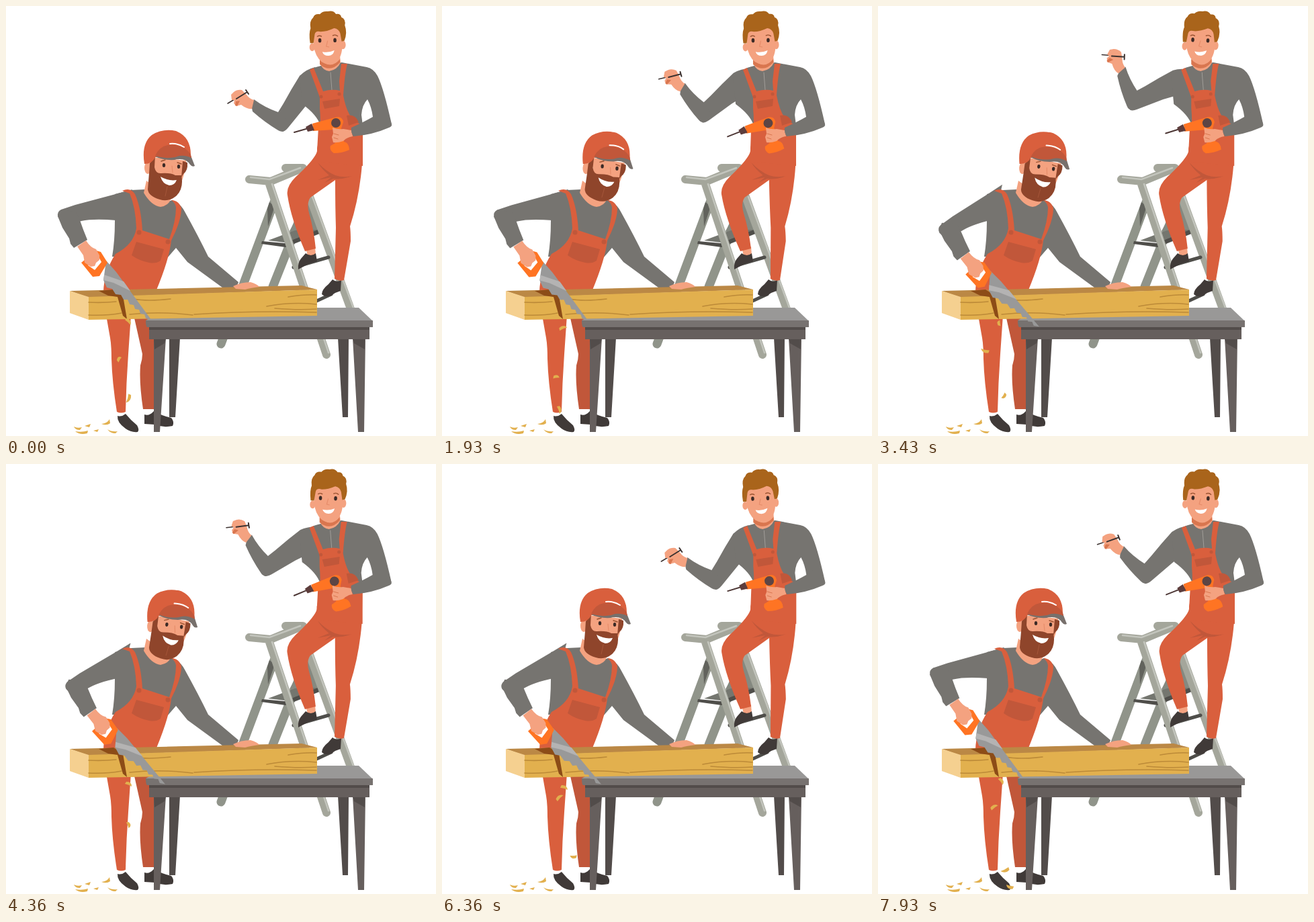
Recreate the animation shown at these times as an HTML page. Size 640 px wide and 640 px high, loop 8000 ms.

```html
<!DOCTYPE html>
<html lang="en">
<head>
<meta charset="utf-8">
<title>Carpenters at work</title>
<style>
html, body { margin: 0; width: 100%; height: 100%; overflow: hidden; background: #fff; }
svg { display: block; width: 100vw; height: 100vh; }
.red { fill: #d95f3d; } .rust { fill: #c1573a; } .shirt { fill: #767470; }
.skin { fill: #f4a280; } .blush { fill: #d9764f; } .hair { fill: #a9641b; } .beard { fill: #8f452b; }
.shoe { fill: #403a38; } .tool { fill: #ff7423; } .dark { fill: #524c4a; } .table { fill: #665f5d; }
.wood { fill: #e2b04e; } .white { fill: #fff; } .eye { fill: #3b2a26; }
.line { fill: none; stroke-linecap: round; stroke-linejoin: round; }
.rail { stroke: #a4a69b; stroke-width: 12; } .back { stroke: #90948a; stroke-width: 13; }
.shine { stroke: #c3c5bd; stroke-width: 2.5; } .step { stroke: #4f4e4a; stroke-width: 5; }
.grain { stroke: #bc8a38; stroke-width: 1.6; } .brow { stroke: #9a5230; stroke-width: 1.4; }
</style>
</head>
<body>
<svg viewBox="0 0 640 640">
  <g id="ladder">
    <path class="line back" d="M399 292L320 503M444 300L397 418"/>
    <path fill="#62635d" d="M392 292L400 298 390 328 389 302Z"/>
    <path fill="#858980" d="M422 335L448 286 456 290 466 334 430 347Z"/>
    <path fill="#74766f" d="M390 349L430 334 467 333 415 352Z"/>
    <path fill="#4f4e4a" d="M381 350L414 353 467 332 469 338 416 359 380 354Z"/>
    <path class="line rail" d="M452 284L520 470"/>
    <path class="line shine" d="M456 284L518 452"/>
    <path class="line step" d="M428 389L480 374M458 441L484 429"/>
    <path class="line rail" d="M416 241L442 241 394 261 362 258M391 262L477 519"/>
    <path class="line shine" d="M364 255L392 258 438 241M396 265L480 516"/>
  </g>

  <path class="skin" d="M446 359L460 358 461 371 449 372Z"/>
  <path class="shoe" d="M435 392Q434 382 439 376L446 368Q454 374 461 368L463 380 450 384Z"/>
  <path class="shoe" d="M470 429Q470 422 480 414L486 407Q492 412 499 408L498 424 490 427 484 431Q475 434 470 429Z"/>
  <g id="legs">
    <path class="red" d="M463 216Q461 226 436 250Q416 267 419 282Q424 316 445 365L461 361Q458 332 451 308Q447 294 453 285L490 259Q490 300 491 330L489 406Q496 410 503 408L513 350Q513 335 512 328Q526 285 530 235L531 180 465 180Z"/>
    <path class="rust" d="M464 233Q476 246 490 252Q502 256 515 253Q500 259 487 257L474 263 484 255 464 259 481 252Q470 243 464 233Z"/>
  </g>

  <g id="painter">
    <g id="upperArm">
      <path class="shirt" d="M460 91Q447 94 437 104Q425 123 413 145L405 158 397 166 396 176 411 187Q415 187 420 181L446 149 464 130Z"/>
      <g id="foreArm">
        <path class="shirt" d="M405 158Q385 151 369 139Q364 147 367 157Q385 173 405 185Q411 189 416 184L422 172Z"/>
        <path class="line" stroke="#3c3230" stroke-width="1.5" d="M330 145L345 136"/>
        <path class="skin" d="M369 140Q362 138 358 132L351 125Q344 124 339 128L335 132 336 140 340 140 339 145 343 149 350 147Q359 154 366 153Z"/>
        <path class="blush" d="M342 142L348 141 344 149 341 148Z"/>
        <path class="line" stroke="#3c3230" stroke-width="2" d="M343 138L359 128M357 125L361 131"/>
      </g>
    </g>
    <path class="shirt" d="M456 93Q470 87 500 84L537 91Q547 93 553 104Q562 122 574 176L546 165Q544 150 538 139Q530 147 529 162L531 178 468 178Q463 162 441 146L437 104Z"/>
    <path class="line" stroke="#a19e99" stroke-width="1" d="M483 99L485 125"/>
    <path class="red" d="M452 95L458 92 472 127Q485 123 497 126L496 112 499 86 508 86Q504 102 502 133Q506 155 514 166Q521 174 531 177L531 238 463 232 463 212Q470 185 467 152L467 136Z"/>
    <path class="rust" d="M471 142L497 138 496 149 474 153ZM507 163Q520 160 525 173L510 178Z"/>
    <circle class="rust" cx="469" cy="135" r="2.5"/><circle class="rust" cx="496" cy="131" r="2.5"/>
    <path class="skin" d="M467 76L497 74 498 84Q493 95 481 97Q472 96 468 87Z"/>
    <path class="blush" d="M467 79Q483 96 497 79L497 84Q483 100 467 87Z"/>
    <g id="painterHead">
      <ellipse class="skin" cx="456" cy="61" rx="4" ry="6"/><ellipse class="skin" cx="502" cy="58" rx="4" ry="6.5"/>
      <path class="skin" d="M458 32L500 30 501 56Q501 76 491 84Q481 90 470 83Q460 75 458 57Z"/>
      <path class="hair" d="M453 55Q451 40 454 33Q452 22 458 17Q460 11 468 12Q472 7 480 8Q488 6 492 12Q499 11 500 17Q507 20 505 29Q509 40 504 52L500 53 498 41Q496 34 489 33Q478 38 469 38Q461 36 460 42L458 55Z"/>
      <ellipse class="eye" cx="467.500" cy="51" rx="2.300" ry="3.200"/><ellipse class="eye" cx="490" cy="51" rx="2.300" ry="3.200"/>
      <path class="line brow" d="M464 45Q467 43 470 45M487 44Q491 42 494 45"/>
      <path class="line" stroke="#e68d6a" stroke-width="1.2" d="M479 52L477 60 481 61"/>
      <path class="white" d="M471 68Q480 70 489 66Q487 74 480 74Q473 74 471 68Z"/>
    </g>
    <g id="drill">
      <path class="line" stroke="#4d3735" stroke-width="2" d="M429 188L450 182"/>
      <path class="tool" d="M456 175L493 165Q501 165 502 173L499 182 503 202Q510 203 511 214Q500 219 488 219Q481 215 483 208L490 204 487 184 457 186Z"/>
      <path fill="#5d3d3c" d="M446 180L455 175 459 185 449 187Z"/>
      <circle fill="#5d4544" cx="491" cy="174" r="7"/>
    </g>
    <path class="skin" d="M486 181Q493 184 502 183L514 185 516 194Q508 195 502 201Q493 204 487 203L485 195 487 190Z"/>
    <path class="line" stroke="#d9764f" stroke-width="1" d="M488 190L495 192M488 196L494 198"/>
    <path class="shirt" d="M546 165Q532 173 514 181Q513 188 517 194Q545 192 570 181Q575 179 574 176L565 150Z"/>
  </g>

  <path class="white" d="M164 600L178 600 179 609 167 611ZM206 597L220 597 219 608 208 609Z"/>
  <path class="rust" d="M190 460L222 460 220 600 204 600Q198 560 200 535Q203 526 203 518Z"/>
  <path class="red" d="M149 460L186 460 182 518Q179 560 178 604Q171 607 165 604Q158 560 157 525Q157 505 155 494Z"/>
  <path class="shoe" d="M166 610Q172 612 178 607Q186 617 195 624Q199 631 196 634Q186 635 178 629Q165 620 166 610ZM206 608Q213 611 220 603Q232 610 246 613Q251 619 248 625Q234 628 222 623L206 622Z"/>

  <path id="sawUpper" class="shirt" d="M188 273L163 280 103 296 82 303Q76 306 77 313L84 326 112 320Q130 316 164 319L172 300Z"/>
  <path class="shirt" d="M162 280L186 274 207 273Q224 300 247 289Q259 293 266 306Q287 344 301 373L346 411 343 419 322 419 270 381 253 360 240 375 158 373Q162 350 162 320Z"/>
  <path class="skin" d="M209 260L205 278Q216 297 230 299Q242 297 245 288L236 280Z"/>
  <path class="red" d="M173 275Q185 269 192 280Q201 300 203 334L243 347Q253 320 253 300Q252 293 246 289Q257 289 261 301Q261 320 246 349Q243 377 223 425L145 425Q146 395 163 369Q190 355 194 331Q193 300 184 279Z"/>
  <path class="rust" d="M194 351L235 362 230 379Q223 384 213 382Q198 379 187 371Z"/>
  <circle class="rust" cx="198" cy="337" r="3.500"/><circle class="rust" cx="241" cy="351" r="3.500"/>

  <g id="sawyerHead">
    <ellipse class="skin" cx="211" cy="241" rx="5" ry="9"/>
    <path class="skin" d="M218 225L268 230Q267 248 261 262L225 262Z"/>
    <path class="beard" d="M263 231L270 233Q271 245 264 250L261 255Z"/>
    <path class="beard" d="M214 234L222 222 221 240Q223 250 231 249Q245 248 252 252L261 252Q265 272 253 283Q242 292 229 288Q212 283 211 273L213 249Z"/>
    <path class="white" d="M230 254Q242 261 254 259Q251 267 243 267Q233 265 230 254Z"/>
    <path class="line" stroke="#a5563a" stroke-width="1" d="M240 269L237 283"/>
    <ellipse class="eye" cx="235" cy="237" rx="2.200" ry="3"/><ellipse class="eye" cx="257" cy="239" rx="2.200" ry="3"/>
    <path class="line brow" d="M231 231L237 229M255 233L261 235"/>
    <path class="line" stroke="#e68d6a" stroke-width="1.2" d="M247 238L248 248"/>
    <path class="red" d="M206 235Q201 205 217 192Q233 182 253 186Q276 195 275 224L222 225Q218 235 206 235Z"/>
    <path fill="#77706c" d="M222 224Q248 216 274 220L281 238Q277 240 274 236Q267 225 251 229Q234 230 222 224Z"/>
    <path class="rust" d="M222 223Q228 209 241 207Q265 205 275 221L276 226Q262 220 252 225Q236 228 222 223Z"/>
    <path class="line" stroke="#fff" stroke-width="2" d="M244 205Q256 204 265 210"/>
  </g>

  <path class="dark" d="M243 494L259 494 252 612 243 612ZM494 494L510 494 509 612 501 612Z"/>
  <path class="table" d="M220 494L238 494 229 634 220 634ZM516 494L535 494 533 634 524 634Z"/>
  <path class="dark" d="M220 495L238 495 236 502 221 511ZM516 495L534 495 534 511 518 502Z"/>
  <path fill="#999897" d="M208 468L240 449 525 449 545 468Z"/>
  <path class="table" d="M213 477H541V496H213Z"/>
  <path class="dark" d="M213 477H541V482H213Z"/>
  <path fill="#777270" d="M208 468H546V478H210Q208 477 208 468Z"/>

  <path fill="#bb8845" d="M95 424L440 416 463 422 123 434Z"/>
  <path fill="#f5d090" d="M95 424L123 433V467L95 457Z"/>
  <path class="wood" d="M123 433L463 422V461L123 467Z"/>
  <path class="line grain" d="M123 441Q145 442 164 440M123 460Q150 461 172 457M190 436Q210 440 245 436M184 459Q230 454 278 460M388 447Q425 440 462 444M400 450Q435 453 462 451M420 433Q445 429 462 430M280 459Q370 453 462 456"/>
  <path fill="#8c4c17" d="M138 424L160 422 174 431 180 466 174 461 166 433 152 431Z"/>
  <path class="skin" d="M338 417Q350 411 364 411Q374 414 377 418Q362 420 356 422L342 421Z"/>

  <g id="sawFore">
    <path class="shirt" d="M82 303L77 313 84 330 94 346 96 354 101 360 121 348 115 333 110 319 104 306Z"/>
    <path fill="#999" d="M149 379L164 396 216 467 208 465 206 459 200 458 198 452 192 451 190 445 184 444 181 437 175 437 171 430 163 429 158 421 150 419 145 408Z"/>
    <path fill="#b4b3b3" d="M146 400L175 410 185 424 160 412 145 408Z"/>
    <path class="tool" d="M112 382L134 364 141 366 151 382 139 402 129 403Z"/>
    <path class="white" d="M122 386L137 372 142 381 132 393Z"/>
    <path class="skin" d="M106 358L119 349Q126 360 134 362L139 371 139 378 134 382 132 387 126 388 117 382 115 371Z"/>
  </g>

  <path class="wood" d="M101 626Q106 629 113 627L110 631Q103 631 101 626ZM117 625L126 622 124 627ZM103 633Q113 635 122 632L121 636Q110 639 103 633ZM130 632L138 630 136 634ZM142 622Q151 621 154 615L155 621Q150 625 142 622ZM151 630Q157 634 166 633L163 636Q155 636 151 630Z"/>
  <g id="chips" class="wood"></g>
</svg>
<script>
const LOOP = 8000, FALL = 900, CHIPS = 26;
const $ = id => document.getElementById(id);
const place = (node, transform) => node.setAttribute('transform', transform);
const wave = (t, period) => (1 - Math.cos(2 * Math.PI * t / period)) / 2;
const ramp = (t, from, to) => wave(Math.min(1, Math.max(0, (t - from) / (to - from))), 2);
const random = seed => Math.abs(Math.sin(seed * 12.9898) * 43758.5453) % 1;

// Shavings leave the cut at a steady pace and drift mostly to the left.
const chips = Array.from({ length: CHIPS }, (_, i) => {
  const node = document.createElementNS('http://www.w3.org/2000/svg', 'path');
  const w = 4 + 3 * random(i + 1);
  node.setAttribute('d', `M${-w} 0Q0 -6 ${w} -1Q1 0 ${1 - w} 4Z`);
  $('chips').append(node);
  return { node, start: (i + random(i + 40)) * LOOP / (CHIPS - 3) - FALL, drift: 75 * random(i + 80) - 55 };
});

function drawChip({ node, start, drift }, t) {
  const p = (t - start) / FALL;
  node.style.display = p >= 0 && p < 1 ? '' : 'none';
  place(node, `translate(${182 + drift * p} ${470 + 160 * p * p}) rotate(${drift * 5 + p * 150})`);
}

function draw(t) {
  const push = wave(t + 20, 1000);
  const shoulder = `rotate(${-18 * push} 163 279)`;
  place($('sawUpper'), shoulder);
  place($('sawFore'), `${shoulder} rotate(${14 * push} 95 314)`);

  const nod = ramp(t, 1200, 2200) - ramp(t, 5250, 6200);
  place($('sawyerHead'), `translate(${nod} ${2 * nod}) rotate(${4 * nod} 238 285)`);

  const lean = -4 * wave(t, 4000);
  place($('painter'), `translate(${lean} 0)`);
  place($('legs'), `translate(0 410) skewX(${Math.atan(-lean / 190) * 180 / Math.PI}) translate(0 -410)`);
  place($('painterHead'), `rotate(${5.5 * wave(t - 6000, 5000) - 2.6} 483 86)`);

  const lift = ramp(t, 400, 3500) - ramp(t, 3600, 5600) + ramp(t, 6700, 9800);
  place($('upperArm'), `rotate(${30 * lift} 454 105)`);
  place($('foreArm'), `rotate(${6 * lift} 410 178)`);
  place($('drill'), `rotate(${-7 * wave(t, 3000)} 494 190)`);

  chips.forEach(chip => drawChip(chip, t));
}

const begin = performance.now();
function frame() {
  draw((performance.now() - begin) % LOOP);
  requestAnimationFrame(frame);
}
frame();
</script>
</body>
</html>
```
